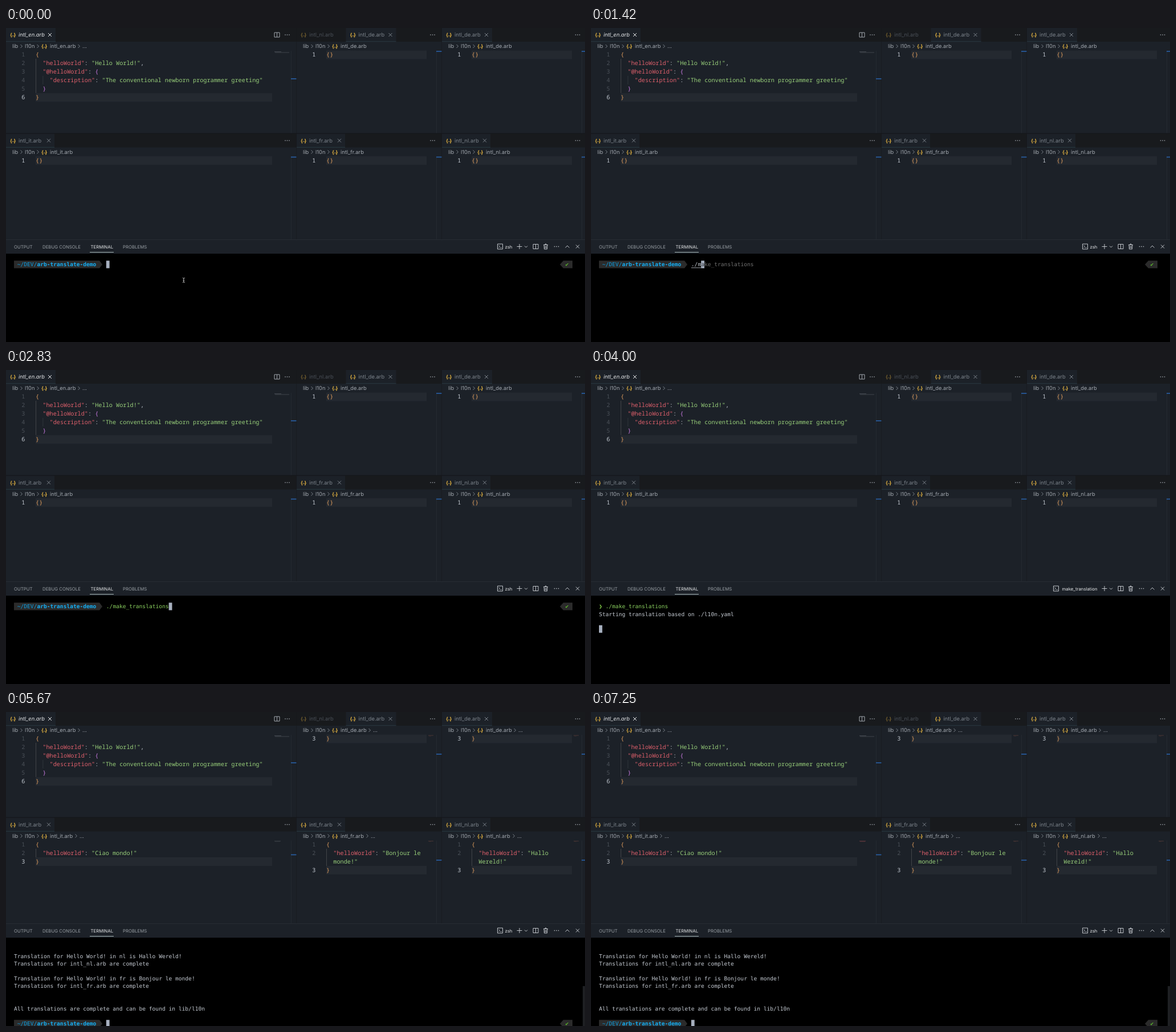
Recreate the animation shown at these times as an HTML page. Size 1016 by 551 pixels, loop 7.41 s.

```html
<!DOCTYPE html>
<html lang="en">
<head>
<meta charset="utf-8">
<title>Translation demo</title>
<style>
  html, body { margin: 0; width: 100%; height: 100%; overflow: hidden; background: #000; }
  svg { display: block; width: 100vw; height: 100vh; }
  text { white-space: pre; text-rendering: geometricPrecision; }
  .ui { font: 9.3px Inter, sans-serif; }
  .panel { font: 7.8px Inter, sans-serif; }
  .code { font: 10.23px "Noto Sans Mono", monospace; font-variant-ligatures: none; }
  .term { font: 9.6px "DejaVu Sans Mono", monospace; }
  .bold { font-weight: 700; }
  .focus { font-style: italic; }
  .badge { font: 600 9px "Noto Sans Mono", monospace; }
  .icon { fill: none; stroke-width: 1; }
</style>
</head>
<body>
<svg id="stage" viewBox="0 0 1016 551"></svg>
<script>
const LOOP = 7410;
const COL = 5.78, ROW = 13.2;
const C = {
  editor: "#1c2128", bar: "#181a1d", line: "#242930", border: "#14171b", ruler: "#292e35",
  dim: "#4a5058", muted: "#7d848c", crumb: "#a3a9b0", plain: "#c3c9d1", bright: "#e6e8ea",
  key: "#e0606c", string: "#98cf7a", brace: "#dd9b5c", inner: "#c678dd",
  yellow: "#e3b341", mark: "#2860a8", prompt: "#2b2b2b", path: "#0c9de0", green: "#8ad05f",
  cursor: "#a7b0bf", ghost: "#707070", thumb: "#1e2023"
};
const COMMAND = "./make_translations";
const AT = {
  type: 1080, typed: 2420, enter: 3500, title: 3670, start: 3750, output: 4080,
  files: 4250, colour: 4420, zsh: 4500, crumbs: 4830, minimap: 6580
};

const rect = (x, y, w, h, fill, extra = "") =>
  `<rect x="${x}" y="${y}" width="${w}" height="${h}" fill="${fill}" ${extra}/>`;
const path = (d, stroke, extra = "") => `<path class="icon" d="${d}" stroke="${stroke}" ${extra}/>`;
const text = (kind, x, y, content, fill, extra = "") =>
  `<text class="${kind}" x="${x}" y="${y + (kind === "panel" ? 2.9 : 3.4)}" fill="${fill}" ${extra}>${content}</text>`;
const span = ([kind, content]) => `<tspan fill="${C[kind]}">${content}</tspan>`;
const clamp = v => Math.max(0, Math.min(1, v));

const cross = (x, y, c) => path(`M${x - 3} ${y - 3}l6 6m0-6l-6 6`, c);
const dots = (x, y, c) => [-3.5, 0, 3.5].map(d => rect(x + d - .7, y - .7, 1.4, 1.4, c)).join("");
const split = (x, y, c) => path(`M${x - 4.5} ${y - 4}h9v8h-9zM${x} ${y - 4}v8`, c);
const jsonIcon = (x, y) => text("badge", x - .7, y - .4, "{", C.yellow) + text("badge", x + 5.8, y - .4, "}", C.yellow)
  + rect(x + 4, y + 1.2, 1.2, 1.2, C.yellow) + rect(x + 6.1, y + 1.2, 1.2, 1.2, C.yellow);
const chevron = (x, y) => path(`M${x - 1.5} ${y - 3}l3 3l-3 3`, C.muted);

function tab(x, y, width, name, state) {
  const active = state !== "hidden", focus = state === "focus";
  const fill = focus ? C.bright : active ? C.muted : C.dim;
  return rect(x, y, width, 24, active ? C.editor : C.bar)
    + (active ? rect(x, y + 23.4, width, .8, "#2d4048") : "")
    + `<g opacity="${active ? 1 : .45}">${jsonIcon(x + 7, y + 12)}</g>`
    + text(focus ? "ui focus" : "ui", x + 22, y + 12, name, fill)
    + (active ? cross(x + width - 10, y + 12, fill) : "");
}

function breadcrumb(x, y, name, more) {
  return text("ui", x + 11, y, "lib", C.crumb) + chevron(x + 27, y)
    + text("ui", x + 33, y, "l10n", C.crumb) + chevron(x + 56, y)
    + jsonIcon(x + 62, y) + text("ui", x + 77, y, name, C.crumb)
    + (more ? chevron(x + more, y) + text("ui", x + more + 6, y, "...", C.crumb) : "");
}

// Each row: { n: line number, tokens, current }
function code(x, y, width, rows) {
  return rows.map(({ n, tokens, current }, i) => {
    const cy = y + 47 + i * 14.95;
    return (current ? rect(x + 52, cy - 7.4, width, 15, C.line) : "")
      + (n ? text("code", x + 30.3, cy, n, current ? C.plain : C.dim, 'text-anchor="middle"') : "")
      + text("code", x + 52, cy, tokens.map(span).join(""), C.plain);
  }).join("");
}

const guide = (x, y1, y2, c = "#4b4e50") => rect(x, y1, .8, y2 - y1, c);

function pane({ x, y, right, tabs, name, more, rows, mark, map }) {
  const edge = right - 10;
  const codeWidth = x ? 176 : 415;
  return rect(x, y, right - x, 185.5, C.editor) + rect(x, y, right - x, 24, C.bar)
    + tabs.map(t => tab(t[0], y, t[1], t[2], t[3])).join("")
    + dots(x === 765 ? 1003 : right - 16.5, y + 12, C.crumb)
    + breadcrumb(x, y + 32, name, more)
    + code(x, y, codeWidth, rows)
    + rect(edge, y + 40, .7, 145, C.ruler)
    + rect(edge, mark - .8, 10, 1.6, C.mark)
    + (map ? rect(x ? right - 24 : 471, y + 40.7, x ? 9 : 11, .8, map, 'opacity=".65"')
           + rect(x ? right - 23 : 472, y + 42, x ? 4 : 9, .6, map, 'opacity=".4"') : "")
    + rect(right - .5, y, 1, 185.5, C.border);
}

const token = { open: ["brace", "{"], close: ["brace", "}"] };
const emptyRows = [{ n: 1, tokens: [["brace", "{}"]], current: true }];
const tailRow = [{ n: 3, tokens: [token.close], current: true }];

function translatedRows(first, second, coloured) {
  const k = coloured ? "key" : "plain", s = coloured ? "string" : "plain";
  const rows = [
    { n: 1, tokens: [token.open] },
    { n: 2, tokens: [["plain", "  "], [k, '"helloWorld"'], ["plain", ": "], [s, first]] }
  ];
  if (second) rows.push({ tokens: [["plain", "  "], [s, second]] });
  return [...rows, { n: 3, tokens: [token.close], current: true }];
}

const englishRows = [
  [token.open],
  [["key", '  "helloWorld"'], ["plain", ": "], ["string", '"Hello World!"'], ["plain", ","]],
  [["key", '  "@helloWorld"'], ["plain", ": "], ["inner", "{"]],
  [["key", '    "description"'], ["plain", ": "], ["string", '"The conventional newborn programmer greeting"']],
  [["inner", "  }"]],
  [token.close]
].map((tokens, i) => ({ n: i + 1, tokens, current: i === 5 }));

function editors(t) {
  const done = t >= AT.files, coloured = t >= AT.colour, outline = t >= AT.crumbs;
  const map = done ? "#70483f" : "";
  const fade = done ? 1 - clamp((t - 4750) / 750) : 0;
  const german = done ? tailRow : emptyRows;
  const panes = [
    { x: 0, y: 0, right: 510, tabs: [[0, 87, "intl_en.arb", "focus"]], name: "intl_en.arb",
      more: 128, rows: englishRows, mark: 89.2 },
    { x: 510, y: 0, right: 765, name: "intl_de.arb", more: outline && 128, rows: german, mark: done ? 74 : 41, map,
      tabs: [[510, 86, "intl_nl.arb", "hidden"], [596.5, 88, "intl_de.arb"]] },
    { x: 765, y: 0, right: 1020, tabs: [[765, 88, "intl_de.arb"]], name: "intl_de.arb",
      more: outline && 128, rows: german, mark: done ? 74 : 41, map },
    { x: 0, y: 185.5, right: 510, tabs: [[0, 85, "intl_it.arb"]], name: "intl_it.arb",
      more: outline && 123, mark: done ? 250.5 : 226.5, map: done && (t < AT.minimap ? "#555b62" : "#a04c50"),
      rows: done ? translatedRows('"Ciao mondo!"', "", coloured) : emptyRows },
    { x: 510, y: 185.5, right: 765, tabs: [[510, 85, "intl_fr.arb"]], name: "intl_fr.arb",
      more: outline && 124, mark: done ? 260 : 226.5, map,
      rows: done ? translatedRows('"Bonjour le', 'monde!"', coloured) : emptyRows },
    { x: 765, y: 185.5, right: 1020, tabs: [[765, 85, "intl_nl.arb"]], name: "intl_nl.arb",
      more: outline && 126, mark: done ? 260 : 226.5, map,
      rows: done ? translatedRows('"Hallo', 'Wereld!"', true) : emptyRows }
  ];
  return panes.map(pane).join("")
    + split(475.5, 12, C.crumb)
    + guide(52, 54, 114) + guide(64.5, 84, 99, "#343a41")
    + rect(471, 41.4, 12, .8, "#565c62") + rect(472, 42.6, 25, .8, "#474d53")
    + (done ? guide(52, 240, 255) + guide(562, 240, 270) + guide(817, 240, 270) : "")
    + [755, 1010].map(x => rect(x, 75, 9.5, 110, "#5a6069", `opacity="${(fade * .25).toFixed(2)}"`)).join("")
    + rect(0, 184.5, 1016, 1, C.border);
}

function panelHeader(t) {
  const running = t >= AT.title && t < AT.zsh;
  const icon = running ? 811.5 : 862.5, y = 383.5, c = "#bfc3c8";
  const titles = [[14, "OUTPUT"], [64, "DEBUG CONSOLE"], [148.5, "TERMINAL"], [205, "PROBLEMS"]];
  return rect(0, 371, 1016, 25, C.editor) + rect(0, 371, 1016, .8, "#2b3037")
    + titles.map(([x, s]) => text("panel", x, 384, s, s === "TERMINAL" ? C.bright : "#9aa0a6")).join("")
    + rect(147, 393, 42, 1, "#a9b8b8")
    + path(`M${icon} ${y - 4.5}h9v9h-9zM${icon + 2} ${y - 2}l2 2l-2 2m3 0h2`, c)
    + text("panel", 888.5, 384, running ? "make_translation" : "zsh", C.bright, 'text-anchor="end"')
    + path(`M896.5 ${y}h9m-4.5-4.5v9M910 ${y - 1}l2.5 2.5l2.5-2.5`, c)
    + split(929.5, y, c)
    + path(`M943 ${y - 3}h8m-5 0v-1.5h2v1.5m-4 0l.5 7.5h5l.5-7.5m-4 2v4m2-4v4`, c)
    + dots(966, y, c) + path(`M981.5 ${y + 2}l3.5-3.5l3.5 3.5`, c) + cross(1003, y, c);
}

const termX = col => 14 + col * COL;
const termText = (col, row, s, fill = C.plain, extra = "") => text("term", termX(col), 415 + row * ROW, s, fill, extra);
const termCursor = (col, row) => rect(termX(col), 408.3 + row * ROW, 5.8, 13.2, C.cursor);

function prompt(row) {
  const y = 408.3 + row * ROW;
  return `<path fill="${C.prompt}" d="M14 ${y}h150l5 6.6l-5 6.6h-150zM994 ${y}h-16l-6 6.6l6 6.6h16z"/>`
    + termText(1, row, `~/DEV/<tspan class="bold" fill="#14aff5">arb-translate-demo</tspan>`, C.path)
    + text("term", 981.5, 415 + row * ROW, "✔", "#5cb82c");
}

function typedCount(t) {
  if (t < AT.type) return 0;
  if (t < 1330) return 1;
  if (t < 1420) return 2;
  if (t < 1580) return 3;
  return Math.min(COMMAND.length, 3 + Math.floor((t - 1420) / (AT.typed - 1420) * 16));
}

function commandLine(t) {
  const n = typedCount(t), complete = n === COMMAND.length;
  const typed = COMMAND.slice(0, n), rest = n ? COMMAND.slice(n) : "";
  return prompt(0) + termCursor(28 + n, 0)
    + termText(28, 0, typed, complete ? C.green : C.plain)
    + (n && !complete ? rect(termX(28), 420.4, n * COL, .8, C.plain) : "")
    + termText(28 + n, 0, rest.slice(0, 1), "#30343a")
    + termText(29 + n, 0, rest.slice(1), C.ghost);
}

const greetings = [["de", "Hallo Welt!"], ["it", "Ciao mondo!"], ["nl", "Hallo Wereld!"], ["fr", "Bonjour le monde!"]];
const log = [
  COMMAND, "Starting translation based on ./l10n.yaml", "",
  ...greetings.flatMap(([lang, s]) => [
    `Translation for Hello World! in ${lang} is ${s}`, `Translations for intl_${lang}.arb are complete`, ""
  ]),
  "", "All translations are complete and can be found in lib/l10n", ""
];

function output(t) {
  const count = t < AT.start ? 1 : t < AT.output ? 3 : t < 4170 ? 6 : t < AT.files ? 12 : log.length;
  const finished = count === log.length;
  const top = Math.max(0, count - 10);
  const lines = log.slice(top, count).map((s, i) => top + i === 0
    ? termText(0, 0, "❯", "#8fe04f") + termText(2, 0, s, C.green)
    : termText(0, i, s)).join("");
  const row = count - top;
  return lines + (finished ? prompt(row) : "") + termCursor(finished ? 28 : 0, row)
    + (top ? rect(1012, 481, 4, 70, C.thumb) : "");
}

function terminal(t) {
  const pointer = t < AT.type
    ? path("M309.8 438.5q2 0 2 1.5v5q0 1.5-2 1.5M313.8 438.5q-2 0-2 1.5M313.8 446.5q-2 0-2-1.5M310.5 443h2.6", "#b8b8b8") : "";
  return rect(0, 396, 1016, 155, "#000") + (t < AT.enter ? commandLine(t) : output(t)) + pointer;
}

const stage = document.getElementById("stage");
let shown = "";

function render(t) {
  const scene = editors(t) + panelHeader(t) + terminal(t);
  if (scene !== shown) stage.innerHTML = shown = scene;
}

const began = performance.now();
function tick() {
  render((performance.now() - began) % LOOP);
  requestAnimationFrame(tick);
}
tick();
</script>
</body>
</html>
```
